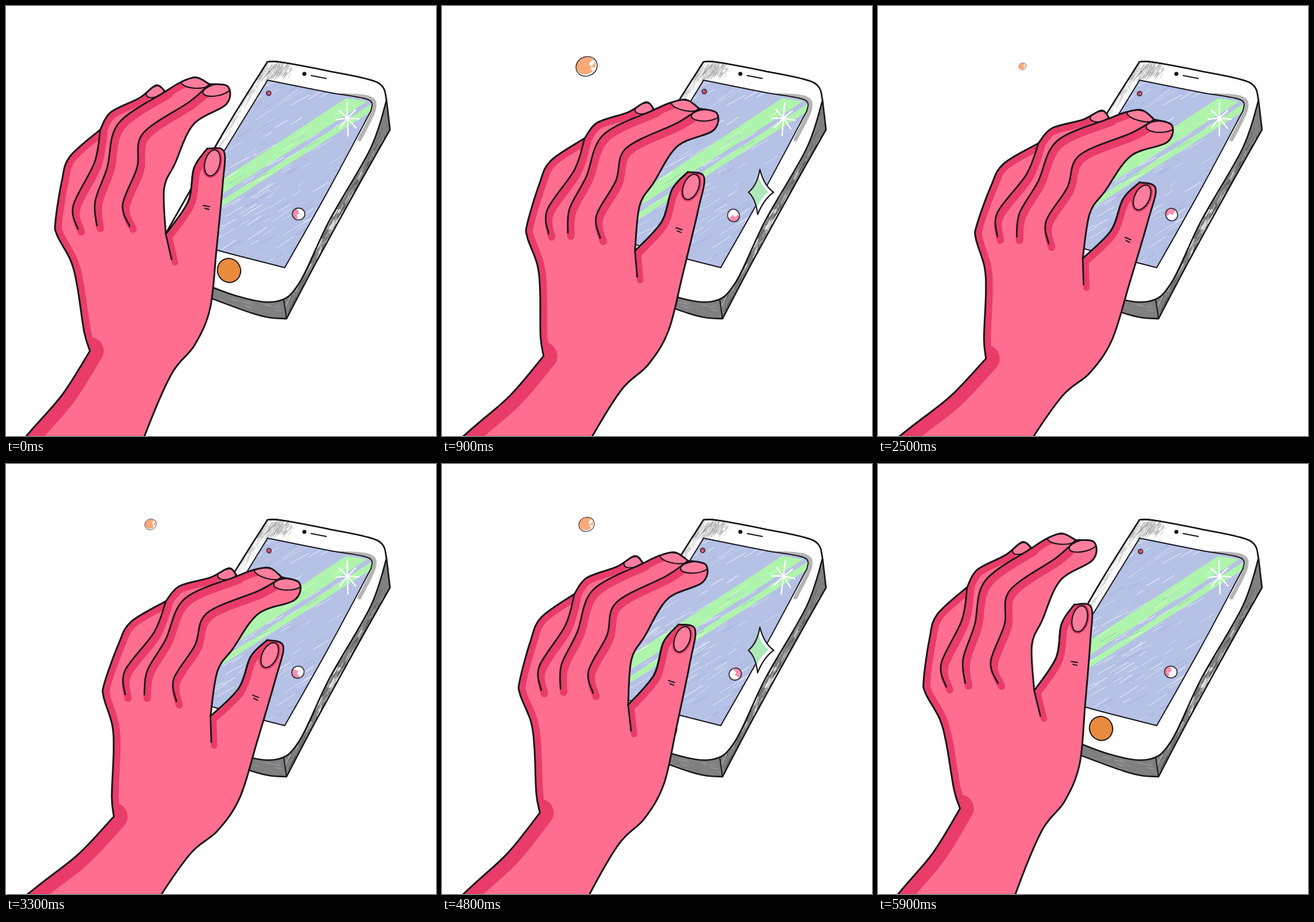
Recreate the animation shown at these times as an HTML page with a canvas. Size 748 by 748 pixels, loop 6000 ms.

```html
<!DOCTYPE html>
<html lang="en">
<head>
<meta charset="utf-8">
<title>Hand and phone</title>
<style>
  html, body { margin: 0; width: 100%; height: 100%; overflow: hidden; background: #fff; }
  canvas { display: block; width: 748px; height: 748px; }
</style>
</head>
<body>
<canvas id="stage" width="748" height="748"></canvas>
<script>
const LOOP = 6000, STEP = 100, SIZE = 748;
const INK = '#19141a', PINK = '#ff6e8f', SHADE = '#e93c68', NAIL = '#fd7d9d';
const rad = deg => deg * Math.PI / 180;
const stage = document.getElementById('stage').getContext('2d');
const phone = new OffscreenCanvas(SIZE, SIZE);
let g = phone.getContext('2d');

// Smooth curve through the points of each part; parts meet in sharp corners.
function curve(...parts) {
  const path = new Path2D();
  parts.forEach((part, k) => {
    const p = part.split(' ').map(s => s.split(',').map(Number));
    path[k ? 'lineTo' : 'moveTo'](...p[0]);
    for (let i = 0; i < p.length - 1; i++) {
      const b = p[i], c = p[i + 1], a = p[i - 1] || b, d = p[i + 2] || c;
      path.bezierCurveTo(b[0] + (c[0] - a[0]) / 6, b[1] + (c[1] - a[1]) / 6,
        c[0] - (d[0] - b[0]) / 6, c[1] - (d[1] - b[1]) / 6, c[0], c[1]);
    }
  });
  return path;
}

function closed(...parts) {
  const path = curve(...parts);
  path.closePath();
  return path;
}

function oval(x, y, rx, ry = rx, turn = 0) {
  const path = new Path2D();
  path.ellipse(x, y, rx, ry, rad(turn), 0, 2 * Math.PI);
  return path;
}

function paint(path, fill, stroke, width = 2.6) {
  if (fill) { g.fillStyle = fill; g.fill(path); }
  if (stroke) { g.strokeStyle = stroke; g.lineWidth = width; g.stroke(path); }
}

function inside(clip, draw) {
  g.save();
  g.clip(clip);
  draw();
  g.restore();
}

function place(x, y, turn, scale, draw) {
  if (scale < .01) return;
  g.save();
  g.translate(x, y);
  g.rotate(rad(turn));
  g.scale(scale, scale);
  draw();
  g.restore();
}

/* ---------- phone ---------- */
let seed = 11;
const random = () => (seed = (seed * 16807) % 2147483647) / 2147483647;

// Pencil strokes scattered along the line from (ax, ay) to (bx, by).
function pencil(count, ax, ay, bx, by, spread, angle, length, color) {
  for (let i = 0; i < count; i++) {
    const f = random(), l = length * (.3 + random());
    const x = ax + (bx - ax) * f + (random() - .5) * spread;
    const y = ay + (by - ay) * f + (random() - .5) * spread;
    place(x, y, angle + random() * 6 - 3, 1, () => paint(curve(`0,0 ${l},0`), null, color, .6 + random()));
  }
}

function drawPhone() {
  g.lineCap = g.lineJoin = 'round';
  const left = '262,424 382,214 455,97', top = '455,97 480,98 560,113 646,133 662,164';
  const body = closed(left, top, '662,164 668,215', '668,215 606,325 540,445 488,544', '488,544 430,535 270,475');
  const face = closed(left, top, '662,164 634,248 562,374 510,482 470,514 400,504 300,465');
  const screen = closed('455,129 560,150 630,163 635,182', '635,182 560,322 485,455', '485,455 365,424 290,398');

  paint(body, '#7f7f80');
  inside(body, () => {
    pencil(75, 665, 200, 500, 510, 32, 118, 22, 'rgba(70,70,72,.5)');
    pencil(60, 662, 210, 500, 505, 30, 118, 18, 'rgba(255,255,255,.5)');
    pencil(40, 590, 345, 535, 445, 20, 118, 14, '#fff');
    pencil(30, 370, 508, 480, 530, 24, 15, 14, 'rgba(165,165,168,.5)');
  });
  paint(body, null, INK);

  paint(face, '#fff');
  inside(face, () => {
    pencil(260, 495, 105, 445, 115, 22, 125, 9, 'rgba(150,150,150,.35)');
    pencil(260, 450, 110, 270, 400, 14, 122, 14, 'rgba(155,155,155,.35)');
    paint(curve('585,155 632,160 640,180 615,232'), null, 'rgba(130,130,130,.6)', 7);
  });
  paint(face, null, INK);
  paint(curve('483,510 488,544'), null, INK, 2);

  paint(screen, '#b5c1e5');
  inside(screen, () => {
    paint(closed('592,160 300,352', '300,376 628,166'), '#aff4ac');
    paint(closed('636,170 300,387', '300,398 636,183'), '#aff4ac');
    pencil(150, 460, 135, 430, 440, 240, -31, 32, 'rgba(255,255,255,.55)');
    pencil(50, 440, 180, 500, 430, 200, -31, 28, 'rgba(140,155,212,.4)');
  });
  paint(screen, null, INK, 2);

  paint(oval(519, 118, 3.6), INK);
  paint(curve('531,121 557,126'), null, INK, 2.2);
  paint(oval(388, 460, 20, 21, -25), '#e98b3c', INK, 2);
}

/* ---------- hand ---------- */
const arm = '-90,895 38,745 98,676 146,600';
const palm = '146,600 136,567 124,488 113,444 89,399 86,375 97,305 111,262 164,215';
const fingers = ['164,215 182,185 232,160 261,138 277,149', '277,149 303,133 330,124 354,136'];
const index = '354,136 386,140 383,171 326,206 294,274 275,318 278,397';
const thumbLeft = '278,397 317,340 327,282 350,248';
const thumbRight = '350,248 379,253 377,310 366,425 355,526 328,590 288,640 241,748 190,895';
const hand = closed(arm, palm, ...fingers, index, thumbLeft, thumbRight);
const crease = curve('288,441 278,397', thumbLeft);
const folds = [
  '164,215 154,272 117,347 125,388',
  '277,149 195,205 176,281 155,340 158,382',
  '354,136 320,166 238,222 228,281 203,345 215,383'
].map(s => curve(s));
const nails = [oval(260, 149, 17, 9, -22), oval(330, 134, 25, 9, 3), oval(367, 146, 25, 10, -12)];
const thumbNail = oval(359, 273, 13, 23, 14);

function drawHand() {
  g.translate(-98, -824);
  paint(hand, PINK);
  inside(hand, () => {
    paint(curve(arm), null, SHADE, 48);
    paint(curve(palm, ...fingers), null, SHADE, 24);
    g.translate(6, 5);
    folds.forEach(fold => paint(fold, null, SHADE, 13));
    paint(crease, null, SHADE, 11);
  });
  inside(hand, () => nails.forEach(nail => paint(nail, NAIL, INK, 2.2)));
  paint(thumbNail, null, SHADE, 7);
  paint(thumbNail, NAIL, INK, 2.2);
  paint(hand, null, INK, 3);
  [...folds, crease].forEach(line => paint(line, null, INK, 2.8));
  paint(curve('343,347 354,349'), null, INK, 2);
  paint(curve('346,352 353,354'), null, INK, 2);
}

/* ---------- floating bits ---------- */
const ball = oval(0, 0, 33, 29.5, -25);
function drawBall() {
  paint(ball, '#fff');
  inside(ball, () => {
    paint(oval(-2, -2, 30, 26, -25), '#fda978');
    paint(oval(16, -10, 6, 10, 35), '#fff');
    paint(oval(20, 8, 8, 5, 30), '#fff');
  });
  paint(ball, null, INK, 2.4);
}

const diamond = new Path2D('M-1-40Q6-12 23 0Q6 12-5 39Q-8 12-21 0Q-6-12-1-40Z');
function drawDiamond() {
  paint(diamond, '#fff');
  place(-4, -1, 0, .8, () => paint(diamond, '#aee9ba'));
  paint(diamond, null, INK, 2.2);
}

const bead = oval(0, 0, 11, 10.3);
function drawBead() {
  paint(bead, '#fff');
  inside(bead, () => {
    paint(oval(-6, 0, 7, 9), '#f98fb0');
    paint(oval(0, 3, 3), '#fff');
  });
  paint(bead, null, '#3a3038', 1.8);
}

function drawDot() {
  paint(oval(0, 0, 4), '#b94f68', '#3a2530', 1.5);
  paint(oval(1, -1, 1.2), '#e48a9c');
}

function drawStar() {
  for (let i = 0; i < 8; i++) {
    const a = rad(45 * i);
    paint(curve(`0,0 ${20 * Math.cos(a)},${2 + (i % 2 ? 22 : 29) * Math.sin(a)}`), null, '#fff', 2.4);
  }
}

/* ---------- timing ---------- */
const swing = [[0, 0], [900, 8], [1700, 12.4], [2500, 11], [4000, 10.4], [4800, 6.3], [5800, -1]];

// Rises smoothly from 0 to 1 at the peak, then falls back.
function bump(t, peak, rise, fall) {
  const s = Math.max(0, 1 - Math.abs(t - peak) / (t < peak ? rise : fall));
  return s * s * (3 - 2 * s);
}

// Smooth periodic motion through the keys.
function follow(keys, t) {
  const n = keys.length;
  const key = i => [keys[(i + n) % n][0] + LOOP * Math.floor(i / n), keys[(i + n) % n][1]];
  const slope = i => (key(i + 1)[1] - key(i - 1)[1]) / (key(i + 1)[0] - key(i - 1)[0]);
  const i = keys.findLastIndex(k => k[0] <= t), [a, from] = key(i), [b, to] = key(i + 1);
  const s = (t - a) / (b - a), r = 1 - s;
  return from * r * r * (1 + 2 * s) + to * s * s * (3 - 2 * s)
    + (b - a) * s * r * (slope(i) * r - slope(i + 1) * s);
}

function render(t) {
  const spin = -.12 * t;
  const orbit = (x, y, phase, draw) => {
    const a = rad(phase + spin);
    place(x + 2 * Math.cos(a), y + 2 * Math.sin(a), spin, 1, draw);
  };
  g.fillStyle = '#fff';
  g.fillRect(0, 0, SIZE, SIZE);
  g.drawImage(phone, 0, 0);
  orbit(455.5, 150.5, 45, drawDot);
  orbit(509, 363.8, -90, drawBead);
  place(594, 195, 3 - 5 * Math.cos(rad(spin)), 1, drawStar);
  place(554, 324, 0, Math.max(bump(t, 930, 500, 500), bump(t, 4800, 500, 500)), drawDiamond);
  place(251.5, 105, 0, Math.max(bump(t, 1400, 1100, 1550), bump(t, 4050, 1200, 1350)), drawBall);
  place(98, 824, follow(swing, t), 1, drawHand);
}

drawPhone();
g = stage;
g.lineCap = g.lineJoin = 'round';

let shown = -1;
function tick() {
  const t = Math.floor(performance.now() % LOOP / STEP) * STEP;
  if (t !== shown) render(shown = t);
  requestAnimationFrame(tick);
}
tick();
</script>
</body>
</html>
```
